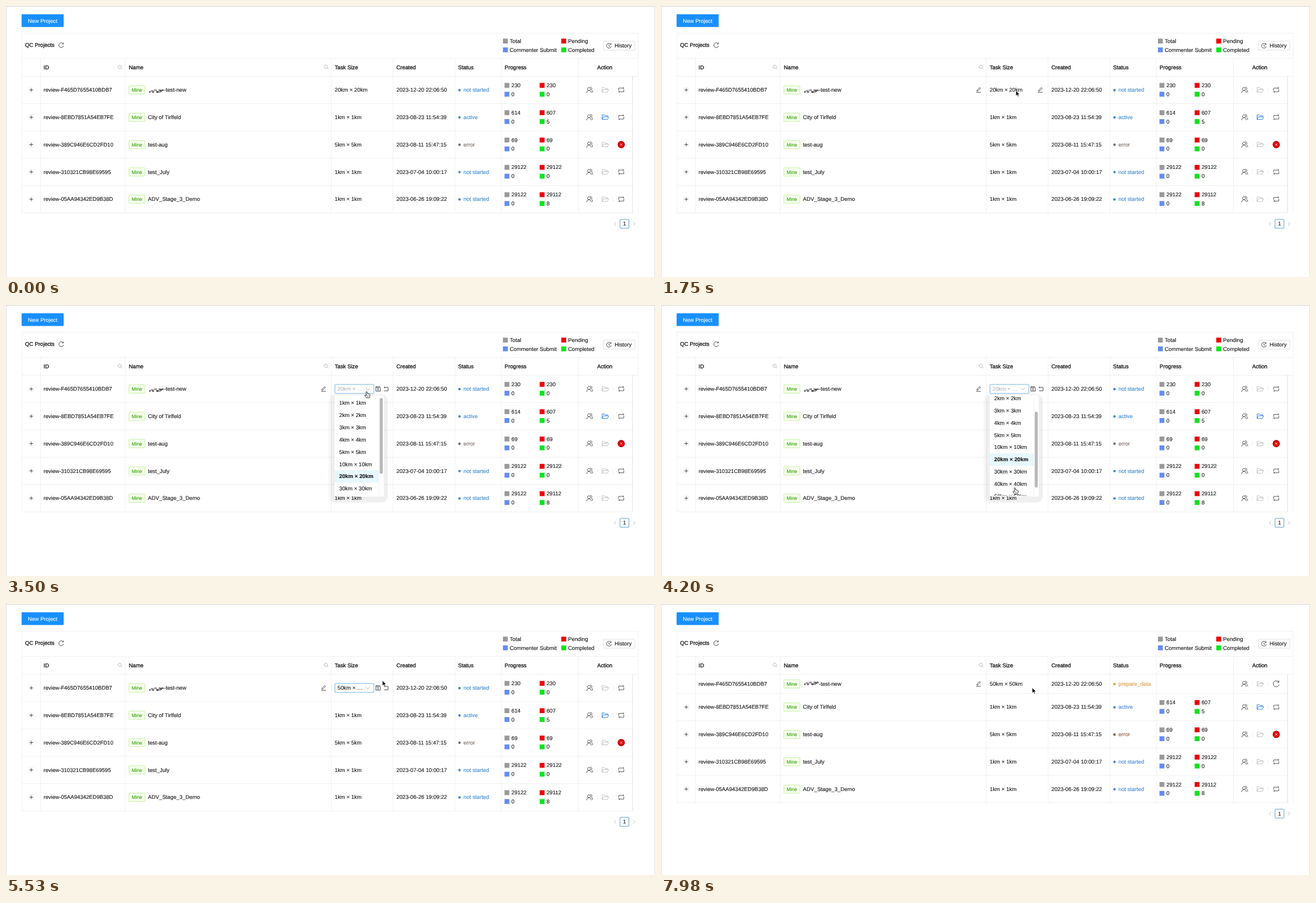
An HTML page for the animation above (8 s loop, 1157 px wide and 484 px high).

```html
<!DOCTYPE html>
<html lang="en">
<head>
<meta charset="utf-8">
<title>QC Projects</title>
<style>
  html, body { margin: 0; width: 100%; height: 100%; overflow: hidden; background: #fff; }
  svg { display: block; width: 100%; height: 100%; }
  text { font: 9.72px "Liberation Sans", Arial, sans-serif; white-space: pre; text-rendering: geometricPrecision; }
</style>
</head>
<body>
<svg id="stage" viewBox="0 0 1157 484">
  <g id="scene"></g>
  <g id="pointer"></g>
</svg>
<script>
const LOOP = 8000;
const EDIT = 2250, OPEN = 3150, PICK = 5130, SAVE = 6500, DONE = 7680;
const INK = '#161616', LINE = '#f0f0f0', BLUE = '#3d88d2';
const BASELINE = 3.2; // from the middle of a line of text

const ICONS = {
  people: 'M-5.2 5.2C-5 2-3 .8-1.2.8S2.6 2 3 5.2M-1.2.8a2.6 2.6 0 1 1 .01 0M1-5a2.6 2.6 0 0 1 2 4.6C4.6.8 5.3 2.5 5.4 4.6',
  folder: 'M-5.6 4V-4.2H-1.6L0-2.6H4V-.8M-5.6 4L-3.5-.8H6L4 4Z',
  swap: 'M-4.5 1V-3.3H4M3-4.6L4.8-3.3 3-2M4.5-1V3.3H-4M-3 2L-4.8 3.3-3 4.6',
  reload: 'M3.4-2.6A4.3 4.3 0 1 0 4.1 1.2M3.8-4.6V-2.2H1.4',
  pencil: 'M-4.2 4.3H4.2M-3 2.2L-2.5.2 2-4.3 3.6-2.7-1 1.8Z',
  save: 'M-4-4H2.5L4-2.5V4H-4ZM-2-4V-1.6H1.6V-4M0 .2a1.2 1.2 0 1 1-.01 0',
  rollback: 'M-3.5 3.4H3.6V-2.8H-3M-2-4.2L-3.6-2.8-2-1.4',
  search: 'M1.6 1.3A2.9 2.9 0 1 1 1.7 1.2L4 3.6',
  clock: 'M3.6-2.4A4.3 4.3 0 1 0 4.2 1M3.8-4.2V-2.2H2M0-2.4V.4L1.8 1.4',
  plus: 'M-3.2 0H3.2M0-3.2V3.2',
  cross: 'M-1.9-1.9L1.9 1.9M1.9-1.9L-1.9 1.9',
  down: 'M-3.4-1.7L0 2 3.4-1.7',
  left: 'M1.8-3.2L-1.8 0 1.8 3.2',
  right: 'M-1.8-3.2L1.8 0-1.8 3.2',
};

const ROWS = [
  { id: 'F465D7655410BDB7', name: '-test-new', size: '20km × 20km', made: '2023-12-20 22:06:50', status: 'not started', counts: [230, 230, 0, 0] },
  { id: '8EBD7851A54EB7FE', name: 'City of Tirlfeld', size: '1km × 1km', made: '2023-08-23 11:54:39', status: 'active', counts: [614, 607, 0, 5] },
  { id: '389C946E6CD2FD10', name: 'test-aug', size: '5km × 5km', made: '2023-08-11 15:47:15', status: 'error', counts: [69, 69, 0, 0] },
  { id: '310321CB98E69595', name: 'test_July', size: '1km × 1km', made: '2023-07-04 10:00:17', status: 'not started', counts: [29122, 29122, 0, 0] },
  { id: '05AA94342ED9B38D', name: 'ADV_Stage_3_Demo', size: '1km × 1km', made: '2023-06-26 19:09:22', status: 'not started', counts: [29122, 29112, 0, 8] },
];
const SIZES = [1, 2, 3, 4, 5, 10, 20, 30, 40, 50].map(n => `${n}km × ${n}km`);
const COLORS = ['#999', '#f00000', '#668cf0', '#0be51c'];
const COLUMNS = [61.5, 212.5, 580, 690, 800.5, 883, 1020.5];

// Pointer path: time, x, y of the tip
const PATH = [
  [350, 614, 490], [840, 680, 345], [1250, 642, 165], [1500, 632.7, 151.2],
  [1780, 632.7, 151.2], [2100, 676, 149], [2600, 676, 149], [3000, 643, 154.5],
  [3560, 643, 154.5], [4050, 630.8, 326.3], [5150, 630.8, 326.3], [5500, 671, 136.7],
  [5600, 671, 136.7], [6050, 661.8, 149.6],
];

const clamp = v => Math.max(0, Math.min(1, v));
const ease = v => { v = clamp(v); return v * v * (3 - 2 * v); };

// Text is placed by its left edge and vertical middle.
const text = (x, y, s, fill = INK, style = '', weight = .12) =>
  `<text x="${x}" y="${y + BASELINE}" fill="${fill}" stroke="${fill}" stroke-width="${weight}" style="${style}">${s}</text>`;
const medium = (x, y, s) => text(x, y, s, INK, '', .32);
const rect = (x, y, w, h, fill, extra = '') => `<rect x="${x}" y="${y}" width="${w}" height="${h}" fill="${fill}" ${extra}/>`;
const box = (x, y, w, h, stroke, fill = '#fff') => rect(x, y, w, h, fill, `stroke="${stroke}" stroke-width=".8" rx="1"`);
const hline = (x1, x2, y, color = LINE) => `<path d="M${x1} ${y}H${x2}" stroke="${color}"/>`;
const vline = (x, y1, y2, color = LINE) => `<path d="M${x} ${y1}V${y2}" stroke="${color}"/>`;
const dot = (x, y, r, fill) => `<circle cx="${x}" cy="${y}" r="${r}" fill="${fill}"/>`;
const icon = (name, x, y, color = '#333', scale = 1, turn = 0) =>
  `<path d="${ICONS[name]}" transform="translate(${x} ${y}) rotate(${turn}) scale(${scale})" fill="none" stroke="${color}" stroke-width="${.9 / scale}"/>`;
const swatch = (x, y, color) => rect(x - .1, y - 4.3, 8.7, 8.7, color);

function mosaic(x, y) {
  const blocks = [[0, 1, 3, '#777'], [3, -1, 5, '#aaa'], [5, 1, 4, '#777'], [9, -2, 5, '#999'], [13, 1, 4, '#555'],
    [17, -2, 4, '#888'], [17, 1, 4, '#aaa'], [20, -1, 3, '#444'], [22, -2, 4, '#777']];
  return blocks.map(([dx, dy, w, c]) => rect(x + dx, y + dy, w, 3.2, c)).join('');
}

function header() {
  const titles = [[67, 'ID'], [219, 'Name'], [586, 'Task Size'], [696, 'Created'], [806, 'Status'], [889, 'Progress'], [1054, 'Action']];
  const legend = [[886, 62.6, 'Total'], [990, 62.6, 'Pending'], [886, 78.3, 'Commenter Submit'], [990, 78.3, 'Completed']];
  return rect(27.8, 14.8, 75, 22.8, '#1890ff', 'rx="1"') + text(39, 26.3, 'New Project', '#fff')
    + hline(28, 1127, 48.5) + hline(28, 1127, 93.5) + hline(28, 1127, 125.5)
    + medium(34, 69.8, 'QC Projects') + icon('reload', 98.5, 70)
    + legend.map(([x, y, s], i) => swatch(x, y, COLORS[i]) + text(x + 12, y, s)).join('')
    + box(1065, 62.8, 56, 16, '#d9d9d9') + icon('clock', 1075, 71) + text(1085, 71, 'History')
    + titles.map(([x, s]) => medium(x, 109.4, s)).join('')
    + icon('search', 203, 109.3, '#aaa') + icon('search', 570.5, 109.3, '#aaa');
}

function statusColor(status, done) {
  if (status === 'error') return done ? '#8f5a40' : '#766a64';
  if (status === 'prepare_data') return '#d99b45';
  return done ? '#4585e0' : BLUE;
}

function sizeEditor(t, y) {
  const saving = t >= SAVE, picked = t >= PICK, open = t >= OPEN && !picked;
  const iconColor = saving ? '#bbb' : '#333';
  return box(586.4, y - 8, 69.5, 16, saving ? '#d9d9d9' : '#4d9ee0')
    + text(591, y, picked ? '50km × …' : '20km × …', open ? '#b5b5b5' : INK)
    + icon('down', 645, y, '#aaa')
    + (saving ? icon('reload', 663, y, '#bbb', .85, t * .36) : icon('save', 663.3, y))
    + icon('rollback', 677.5, y, iconColor);
}

function tableRow(row, i, y, t, hovered) {
  const done = t >= DONE, busy = done && i === 0, editing = i === 0 && t >= EDIT && !done;
  const status = busy ? 'prepare_data' : row.status;
  const color = statusColor(status, done);
  let out = text(67, y, 'review-' + row.id, INK, 'font-size:9.6px')
    + box(219, y - 7.4, 28.7, 14.8, '#b7eb8f', '#f6ffed')
    + text(224, y, 'Mine', '#389e0d', 'font-size:8.7px')
    + (i ? text(253, y, row.name) : mosaic(255, y + (busy ? -2 : 1)) + text(281.5, y, row.name))
    + text(696, y, row.made)
    + dot(808.5, y + .3, 2.2, color) + text(815.5, y, status, color)
    + icon('people', 1040.5, y, '#333') + vline(1054.5, y - 4, y + 4) + vline(1082.5, y - 4, y + 4)
    + icon('folder', 1068.3, y, status === 'active' ? '#1677e8' : '#bbb');

  if (hovered) out += icon('pencil', 566, y);
  if (editing) out += sizeEditor(t, y);
  else {
    out += text(586, y, busy ? '50km × 50km' : row.size);
    if (hovered && !busy) out += icon('pencil', 676, y);
  }

  if (status === 'error') out += dot(1096.8, y, 6.4, '#a80000') + dot(1096.8, y, 5.6, '#e00000') + icon('cross', 1096.8, y, '#fff');
  else out += busy ? icon('reload', 1096.8, y, '#333', 1.25) : icon('swap', 1096.8, y, '#444');

  if (!busy) {
    out += box(40.5, y - 4.6, 9, 9, LINE) + icon('plus', 45, y);
    out += row.counts.map((n, k) => {
      const x = k % 2 ? 951.5 : 888.8, cy = y + (k < 2 ? -8.2 : 7.6);
      return swatch(x, cy, COLORS[k]) + text(x + 12.2, cy, n);
    }).join('');
  }
  return out;
}

function dropdown(t) {
  const opacity = clamp((t - OPEN) / 150) * (1 - clamp((t - PICK) / 150));
  if (!opacity) return '';
  const scroll = ease((t - 3950) / 400);
  const options = SIZES.map((label, i) => {
    const y = 174.8 + i * 21.9 - scroll * 43.8, chosen = i === 6;
    return (chosen ? rect(586, y - 11, 78.5, 22, '#e6f7ff') : '')
      + text(594, y, label, INK, chosen ? 'font-weight:bold' : '');
  }).join('');
  return `<g opacity="${opacity}">`
    + rect(575, 158.5, 106, 195, '#000', 'rx="12" opacity=".03"')
    + rect(579, 160, 101, 192, '#000', 'rx="10" opacity=".03"')
    + rect(586, 161, 87.5, 181, '#fff', 'rx="2"')
    + `<g clip-path="url(#menu)">${options}</g>` + vline(664.8, 164, 340)
    + rect(666.3, 166 + 35.5 * scroll, 5.4, 135.5, '#b8b8b8', 'rx="2.7"') + '</g>';
}

function scene(t, pointerY) {
  const done = t >= DONE;
  const tops = [125.5];
  ROWS.forEach((_, i) => tops.push(tops[i] + (done && i === 0 ? 34.2 : 48.8)));
  const bottom = tops[5], pageY = bottom + 19.5;
  const hover = t >= EDIT ? 0 : tops.findIndex((top, i) => i < 5 && pointerY >= top && pointerY < tops[i + 1]);
  return '<clipPath id="menu"><path d="M586 163H673V340.5H586Z"/></clipPath>'
    + rect(0, 0, 1157, 484, '#fff')
    + hline(0, 1157, .5, '#d2d2d2') + vline(.5, 0, 484, '#dedede') + vline(1156.3, 0, 484, '#dedede')
    + header()
    + tops.slice(1).map(y => hline(28, 1117, y)).join('')
    + COLUMNS.map(x => vline(x, 93, bottom)).join('')
    + vline(28.5, 48, bottom) + vline(1127, 48, bottom) + vline(1117, 125, bottom, '#dcdcdc')
    + ROWS.map((row, i) => tableRow(row, i, (tops[i] + tops[i + 1]) / 2, t, i === hover)).join('')
    + icon('left', 1086, pageY, '#bbb') + icon('right', 1119.5, pageY, '#bbb')
    + box(1094.7, pageY - 8, 15.8, 16, '#2f86c8') + text(1100, pageY + .2, '1')
    + dropdown(t);
}

function pointerAt(t) {
  const next = PATH.findIndex(p => p[0] > t);
  if (next < 0) return PATH[PATH.length - 1].slice(1);
  if (next === 0) return PATH[0].slice(1);
  const [t0, x0, y0] = PATH[next - 1], [t1, x1, y1] = PATH[next];
  const k = ease((t - t0) / (t1 - t0));
  return [x0 + (x1 - x0) * k, y0 + (y1 - y0) * k];
}

const ARROW = '<path d="M0 0V9.4L2.2 7.4 3.7 10.8 5.3 10.1 3.9 6.8H6.8Z" fill="#000" stroke="#fff" stroke-width=".7"/>';
const HAND = '<path d="M-1 0.8Q0-.6 1 .8L1.5 4.2Q2.5 3.4 3.1 4.4 4.2 3.8 4.6 4.9 6 4.5 6 6L5.5 9.2 4.7 11.3H-.2L-3.4 7.4Q-3.6 6-2.2 6.3L-.6 7.3Z" fill="#fff" stroke="#111" stroke-width=".9"/>'
  + '<path d="M1.4 7V9.4M3 7V9.4" stroke="#111" stroke-width=".6"/>';

const sceneNode = document.getElementById('scene');
const pointerNode = document.getElementById('pointer');
let lastScene = '';

function frame(now) {
  const t = now % LOOP;
  const [x, y] = pointerAt(t);
  const markup = scene(t, y);
  if (markup !== lastScene) sceneNode.innerHTML = lastScene = markup;
  const hand = (t > 2000 && t < 5200) || (t > 6000 && t < SAVE);
  pointerNode.innerHTML = hand ? HAND : ARROW;
  pointerNode.setAttribute('transform', `translate(${x} ${y})`);
  requestAnimationFrame(frame);
}
frame(0);
</script>
</body>
</html>
```
